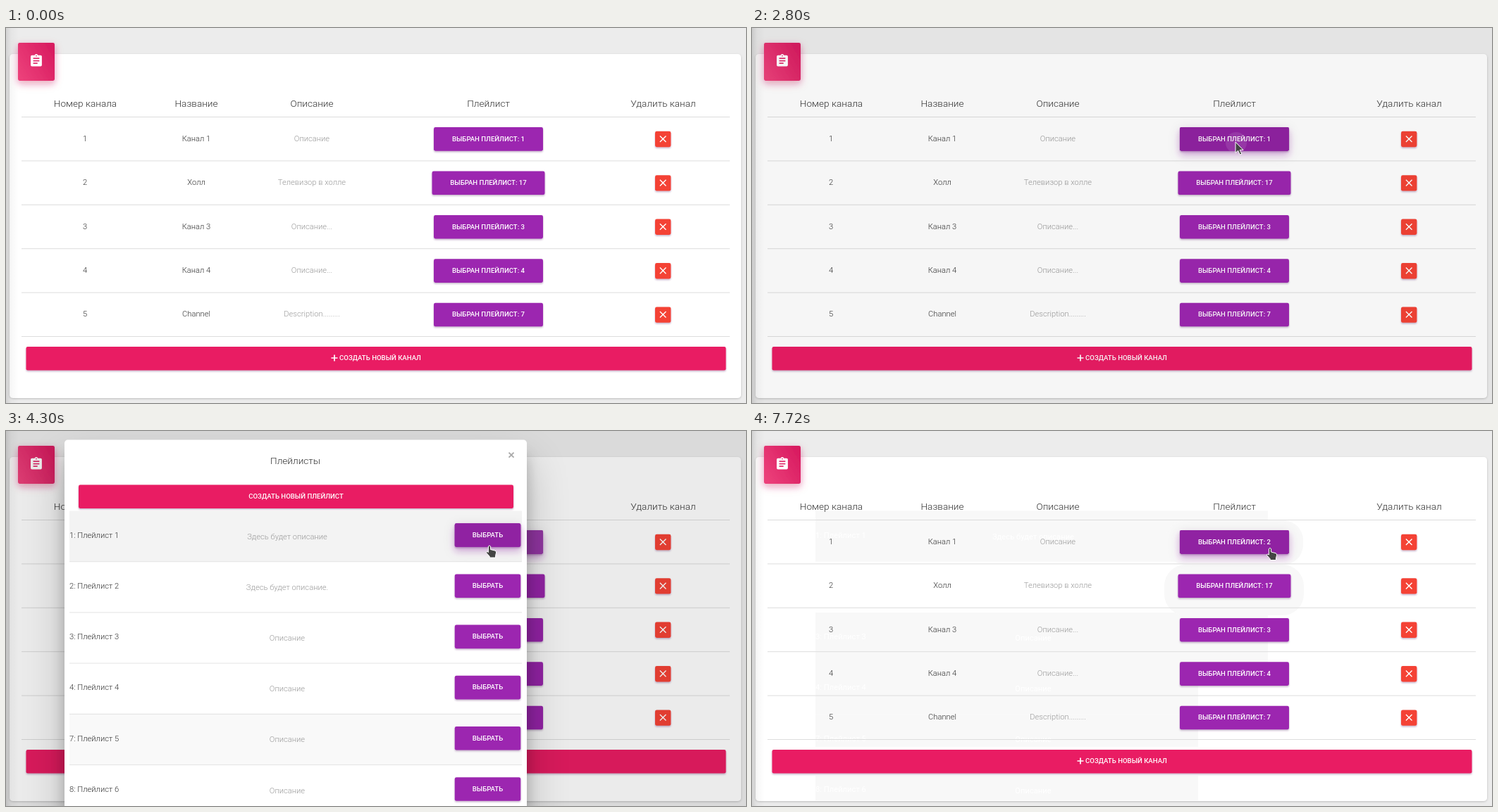
An HTML page for the animation above (7.75 s loop, 1050 by 533 pixels).

```html
<!DOCTYPE html>
<html lang="ru">
<head>
<meta charset="utf-8">
<title>Каналы</title>
<style>
  html, body { margin: 0; width: 100%; height: 100%; overflow: hidden; background: #ececec; }
  svg { display: block; width: 100vw; height: 100vh; }
  text { font: 300 11.2px Roboto, sans-serif; fill: #333; }
  .mid { text-anchor: middle; }
  .head { font-size: 13.6px; }
  .note { fill: #999; }
  .label { font-size: 9.6px; font-weight: 500; fill: #fff; }
  .ghost text { fill: #fff; font-weight: 400; }
</style>
</head>
<body>
<svg id="stage" viewBox="0 0 1050 533" xmlns="http://www.w3.org/2000/svg"></svg>
<script>
const LOOP = 7750;
const PURPLE = '#9c27b0', PINK = '#e91e63', RED = '#f44336';
const ROW_H = 62.4, ITEM_H = 72.2;

const channels = [
  ['1', 'Канал 1', 'Описание', '1'],
  ['2', 'Холл', 'Телевизор в холле', '17'],
  ['3', 'Канал 3', 'Описание...', '3'],
  ['4', 'Канал 4', 'Описание...', '4'],
  ['5', 'Channel', 'Description.........', '7']
];
const playlists = [
  ['1: Плейлист 1', 'Здесь будет описание'],
  ['2: Плейлист 2', 'Здесь будет описание.'],
  ['3: Плейлист 3', 'Описание'],
  ['4: Плейлист 4', 'Описание'],
  ['7: Плейлист 5', 'Описание'],
  ['8: Плейлист 6', 'Описание'],
  ['10: Тест название', 'Тест описание'],
  ['11: Плейлист 7', 'Описание'],
  ['12: Плейлист 8', 'Описание']
];

// Cursor tip over time: [ms, x, y]
const path = [
  [100, 1047, 28], [250, 1046, 28], [400, 985, 33], [560, 905, 43], [720, 835, 54],
  [860, 785, 66], [1000, 743, 79], [1200, 703, 96], [1400, 664, 118], [1660, 648, 146],
  [1780, 643, 147], [1810, 643, 147], [2050, 672, 156], [2250, 698, 166], [2560, 686, 162],
  [4330, 686, 162.5], [4420, 686, 163], [4630, 686, 163], [4750, 686, 176], [4900, 688, 210],
  [5050, 689, 227], [7150, 689, 227], [7300, 697, 214], [7500, 717, 186], [7720, 735, 166]
];
const ARROW = 'M0 0V15.5L3.7 12.2 6.2 18 8.8 16.9 6.3 11.3H11Z';
const HAND = 'M-1.6 1.4Q0-.8 1.6 1.4V6L8 7.6Q9.9 8.4 9.6 10.5L8.5 15V17.5H.2V15.8L-4.6 10.4Q-4.3 8.4-2.7 9.2L-1.6 10Z';
const CLIPBOARD = 'M19 3h-4.2a3 3 0 0 0-5.6 0H5a2 2 0 0 0-2 2v14a2 2 0 0 0 2 2h14a2 2 0 0 0 2-2V5a2 2 0 0 0-2-2z' +
  'm-7 0a1 1 0 0 1 0 2 1 1 0 0 1 0-2zm2 14H7v-2h7zm3-4H7v-2h10zm0-4H7V7h10z';

const $ = id => document.getElementById(id);
const ramp = (t, from, dur) => Math.min(1, Math.max(0, (t - from) / dur));
const rect = (x, y, w, h, fill, more = '') =>
  `<rect x="${x}" y="${y}" width="${w}" height="${h}" fill="${fill}" ${more}/>`;
const text = (x, y, s, cls = '', more = '') => `<text x="${x}" y="${y}" class="${cls}" ${more}>${s}</text>`;
const line = (x1, x2, y, color) => `<path d="M${x1} ${y}H${x2}" stroke="${color}"/>`;
const cross = (x, y, r, color, width) =>
  `<path d="M${x - r} ${y - r}l${2 * r} ${2 * r}m0 ${-2 * r}l${-2 * r} ${2 * r}" stroke="${color}" stroke-width="${width}"/>`;

function button(id, cx, y, w, label) {
  const x = cx - w / 2;
  return rect(x, y, w, 33.6, PURPLE, 'rx="2.4" filter="url(#rest)"') +
    rect(x, y, w, 33.6, '#9023a2', `rx="2.4" filter="url(#lift)" id="${id}" opacity="0"`) +
    text(cx, y + 19.6, label, 'label mid', `id="${id}-label"`);
}

function channelRow([num, name, note, list], i) {
  const y = 126.5 + i * ROW_H, base = y + 34.2;
  return text(112, base, num, 'mid') + text(270, base, name, 'mid') + text(434, base, note, 'mid note') +
    button('pick' + i, 684.5, y + 14.6, list.length > 1 ? 160 : 155, 'ВЫБРАН ПЛЕЙЛИСТ: ' + list) +
    rect(921, y + 20.3, 22.4, 22.4, RED, 'rx="2.4" filter="url(#rest)"') +
    cross(932.2, y + 31.2, 4.3, '#fff', 1.4) +
    line(22, 1027, y + ROW_H, '#ddd');
}

const itemY = i => 113.5 + i * ITEM_H;
const itemText = ([name, note], i) =>
  text(90, itemY(i) + 38.2, name) + text(399, itemY(i) + 40, note, 'mid note');

function playlistRow(item, i) {
  const y = itemY(i);
  return rect(90, y, 642, ITEM_H, '#000', `id="item${i}" opacity="0"`) +
    line(90, 732, y + ITEM_H, '#e4e4e4') + itemText(item, i) +
    button('choose' + i, 683.5, y + 17.7, i === 6 ? 95 : 93.5, 'ВЫБРАТЬ');
}

function cursorAt(t) {
  const k = path.findIndex(p => p[0] > t);
  if (k < 0) return path[path.length - 1].slice(1);
  if (k === 0) return path[0].slice(1);
  const [a, ax, ay] = path[k - 1], [b, bx, by] = path[k];
  const p = (t - a) / (b - a);
  return [ax + (bx - ax) * p, ay + (by - ay) * p];
}

const trailTimes = Array.from({ length: 47 }, (_, i) => 250 + i * 30);
const trail = trailTimes.map(t => {
  const [x, y] = cursorAt(t);
  return `<path d="${ARROW}" transform="translate(${x} ${y})" fill="#f6f6f6" stroke="#f6f6f6" stroke-width="3"/>`;
}).join('');

const ghost = [0, 2, 3, 4, 5].map(i => {
  const bottom = Math.min(itemY(i + 1), i === 4 ? 449 : 525), top = i === 5 ? 490 : itemY(i);
  return rect(90, top, i > 2 ? 543 : 642, bottom - top, '#f8f8f8') + itemText(playlists[i], i);
}).join('') +
  rect(587, 127, 195, 63, '#f8f8f8', 'rx="28"') + rect(585, 190, 198, 72, '#f8f8f8', 'rx="30"');

const heads = [[112.5, 'Номер канала'], [270, 'Название'], [434, 'Описание'], [684.5, 'Плейлист'], [932.5, 'Удалить канал']];

$('stage').innerHTML = `
<defs>
  <filter id="rest" x="-20%" y="-40%" width="140%" height="200%">
    <feDropShadow dx="0" dy="1.5" stdDeviation="1.3" flood-color="#502060" flood-opacity=".35"/>
  </filter>
  <filter id="lift" x="-40%" y="-100%" width="180%" height="350%">
    <feDropShadow dx="0" dy="6" stdDeviation="5" flood-color="${PURPLE}" flood-opacity=".3"/>
    <feDropShadow dx="0" dy="3" stdDeviation="8" flood-color="#000" flood-opacity=".12"/>
  </filter>
  <filter id="card" x="-5%" y="-5%" width="110%" height="110%">
    <feDropShadow dx="0" dy="1" stdDeviation="1.6" flood-opacity=".2"/>
  </filter>
  <filter id="glow" x="-50%" y="-50%" width="200%" height="200%">
    <feDropShadow dx="0" dy="4" stdDeviation="6" flood-color="${PINK}" flood-opacity=".3"/>
    <feDropShadow dx="0" dy="3" stdDeviation="4" flood-opacity=".14"/>
  </filter>
  <filter id="near" x="-20%" y="-20%" width="140%" height="140%"><feGaussianBlur stdDeviation="9.6"/></filter>
  <filter id="far" x="-30%" y="-30%" width="160%" height="160%"><feGaussianBlur stdDeviation="31"/></filter>
  <linearGradient id="badge" x1="0" y1=".8" x2="1" y2=".2">
    <stop stop-color="#ec407a"/><stop offset="1" stop-color="#d81b60"/>
  </linearGradient>
  <linearGradient id="side">
    <stop stop-opacity=".11"/><stop offset=".4" stop-opacity=".03"/><stop offset="1" stop-opacity="0"/>
  </linearGradient>
  <clipPath id="pickClip">${rect(607, 141.1, 155, 33.6, '#000', 'rx="2.4"')}</clipPath>
  <clipPath id="chooseClip">${rect(636.7, 203.4, 93.5, 33.6, '#000', 'rx="2.4"')}</clipPath>
</defs>
${rect(0, 0, 1050, 533, '#ececec')}
${rect(5, 37, 1038, 489, '#fff', 'rx="4.8" filter="url(#card)"')}
${rect(0, 0, 18, 533, 'url(#side)')}
<g id="trail">${trail}</g>
<g id="ghost" class="ghost">${ghost}</g>
${rect(17, 21, 52, 54, 'url(#badge)', 'rx="2.4" filter="url(#glow)"')}
<path d="${CLIPBOARD}" fill="#fff" fill-rule="evenodd" transform="translate(32.4 36.1) scale(.88)"/>
${heads.map(([x, s]) => text(x, 111.5, s, 'head mid')).join('')}
${line(22, 1027, 126.5, '#ddd')}
${channels.map(channelRow).join('')}
<circle id="pickRipple" cx="687" cy="163" fill="#fff" opacity=".1" clip-path="url(#pickClip)"/>
${rect(28.5, 453, 993, 33.6, PINK, 'rx="2.4" filter="url(#rest)"')}
<path d="M461.5 469h9M466 464.5v9" stroke="#fff" stroke-width="1.7"/>
${text(473, 472.4, 'СОЗДАТЬ НОВЫЙ КАНАЛ', 'label')}
${rect(0, 0, 1050, 533, '#000', 'id="backdrop"')}
<g id="modal">
  ${rect(83, 34, 656, 1000, '#000', 'opacity=".2" filter="url(#near)"')}
  ${rect(83, 44, 656, 1000, '#000', 'opacity=".22" filter="url(#far)"')}
  ${rect(83, 12.5, 656, 1000, '#fff', 'rx="4.8"')}
  ${text(410.5, 46.5, 'Плейлисты', 'head mid')}
  ${cross(717, 34.2, 3.5, '#aaa', 1.9)}
  ${playlists.map(playlistRow).join('')}
  ${rect(103, 76.5, 617, 33.6, PINK, 'rx="2.4" filter="url(#rest)"')}
  ${text(411.5, 96, 'СОЗДАТЬ НОВЫЙ ПЛЕЙЛИСТ', 'label mid')}
  <circle id="chooseRipple" cx="689" cy="228" fill="#fff" opacity=".12" clip-path="url(#chooseClip)"/>
</g>
<path id="cursor" fill="#444" stroke="#fff" stroke-linejoin="round"/>`;

const trailMarks = [...$('trail').children];
const show = (id, on) => { $(id).style.display = on ? '' : 'none'; };
const fade = (id, value) => $(id).setAttribute('opacity', value);

function overButton(t, y) {
  if (t < 2760) return y > 141;
  if (t < 3580) return false;
  if (t < 5950) return y < 165 || y > 203.5;
  return t >= 6850 && (y < 174.5 || y > 204);
}

function draw(t) {
  const open = t >= 3580 && t < 5950, closed = t >= 5950;

  const [x, y] = cursorAt(t);
  show('cursor', t >= 100);
  $('cursor').setAttribute('d', overButton(t, y) ? HAND : ARROW);
  $('cursor').setAttribute('transform', `translate(${x} ${y})`);
  show('trail', t < 2700);
  trailMarks.forEach((m, i) => { m.style.display = trailTimes[i] < t - 20 ? '' : 'none'; });
  show('ghost', closed);

  $('pick0-label').textContent = 'ВЫБРАН ПЛЕЙЛИСТ: ' + (closed ? 2 : 1);
  fade('pick0', closed ? ramp(t, 7590, 130) : ramp(t, 1600, 200));
  fade('pick1', closed ? 1 - ramp(t, 7380, 180) : 0);
  const pickRadius = ramp(t, 2590, 210) * 15 + ramp(t, 3580, 120) * 90;
  $('pickRipple').setAttribute('r', closed ? 0 : pickRadius);

  fade('backdrop', closed ? 0 : ramp(t, 2700, 100) * .035 + ramp(t, 3560, 140) * .045);
  show('modal', open);
  if (!open) return;

  const rest = 1 - ramp(t, 3538, 300);
  $('modal').setAttribute('transform', `translate(0 ${-380 * rest * rest})`);
  fade('modal', ramp(t, 3535, 150));

  const residue = t >= 5740 ? .027 : 0;
  playlists.forEach((_, i) => fade('item' + i, residue));
  fade('item0', .047 * ramp(t, 3780, 150) - .02 * ramp(t, 4700, 150));
  fade('item1', .047 * ramp(t, 4800, 150));
  fade('item4', .047 - .022 * ramp(t, 3800, 150));
  fade('choose0', ramp(t, 3800, 200) - ramp(t, 4690, 180));
  fade('choose1', ramp(t, 4870, 180));
  fade('choose4', 1 - ramp(t, 3800, 500));
  $('chooseRipple').setAttribute('r', ramp(t, 5740, 170) * 70);
}

const start = performance.now();
function tick() {
  draw((performance.now() - start) % LOOP);
  requestAnimationFrame(tick);
}
tick();
</script>
</body>
</html>
```
